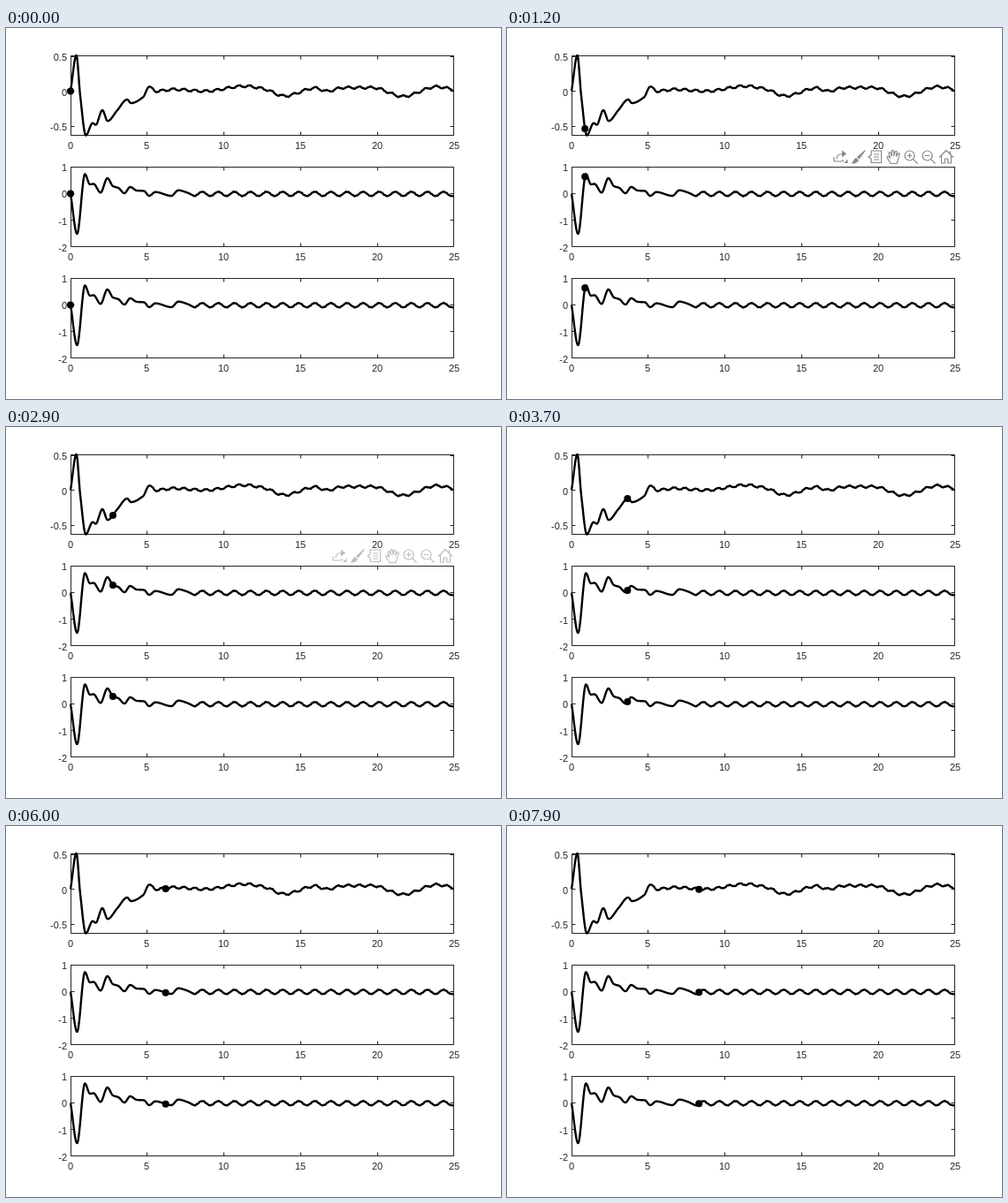
Recreate the animation shown at these times as an HTML page with a canvas. Size 560 px wide and 420 px high, loop 8 s.

```html
<!DOCTYPE html>
<html lang="en">
<head>
<meta charset="utf-8">
<title>Three traces</title>
<style>
  html, body { margin: 0; width: 100%; height: 100%; overflow: hidden; background: #fff; }
  canvas { display: block; }
</style>
</head>
<body>
<canvas id="stage" width="560" height="420"></canvas>
<script>
const ctx = document.getElementById('stage').getContext('2d');
const LOOP = 8000, STEP = 100;
const LEFT = 73, RIGHT = 506;
const INK = '#262626';

const clamp = v => Math.max(0, Math.min(1, v));
const wave = (x, crest, period) => Math.cos(2 * Math.PI * (x - crest) / period);
const grain = x => 0.35 * Math.sin(1.9 * x) * Math.sin(0.37 * x);

// Smooth interpolation that never overshoots the points
function spline(pts) {
  const slope = i => (pts[i + 1][1] - pts[i][1]) / (pts[i + 1][0] - pts[i][0]);
  const tan = pts.map((p, i) => {
    if (i === 0) return slope(0);
    if (i === pts.length - 1) return slope(i - 1);
    const a = slope(i - 1), b = slope(i);
    return a * b <= 0 ? 0 : 2 * a * b / (a + b);
  });
  return x => {
    let i = 0;
    while (i < pts.length - 2 && x > pts[i + 1][0]) i++;
    const [x0, y0] = pts[i], [x1, y1] = pts[i + 1];
    const h = x1 - x0, u = (x - x0) / h, v = 1 - u;
    return y0 * (1 + 2 * u) * v * v + y1 * u * u * (3 - 2 * u)
      + h * u * v * (tan[i] * v - tan[i + 1] * u);
  };
}

// Top trace: main swings and slow drift, with a small ripple once settled
const drift = spline([
  [73, 71.5], [79.6, 31], [84, 77], [90.3, 121.5], [98, 107.7], [101.5, 109.5],
  [109, 93], [115, 105.2], [126, 93], [137, 81], [141.5, 85], [155, 78.3],
  [162, 66.5], [170, 71.5], [190, 69.5], [225, 71.5], [270, 65.8], [292, 69],
  [315, 77], [350, 68], [363, 71.5], [382, 67.5], [415, 67.5], [449, 77.5],
  [487, 66.5], [506, 69.5]
]);
const upper = x => drift(x) + clamp((x - 160) / 10) * (grain(x) - 1.2 * wave(x, 189, 12.4));

// Lower traces: decaying swings that end in a steady ripple
const SETTLED = 213;
const swing = spline([
  [73, 187.5], [80.4, 233], [89.3, 165.5], [95, 177], [99, 176.5], [107, 186.3],
  [114.7, 170], [121, 179], [127, 181], [134, 187], [140.5, 180], [148, 184],
  [156, 184.5], [162, 190], [169, 185.7], [187, 190], [195, 183.7], [204, 186],
  [SETTLED, 190.2]
]);
const lower = x => x < SETTLED ? swing(x) : 187.8 - 2.4 * wave(x, 222, 18.2) + grain(x);

const lowTicks = [[157, '1'], [187.3, '0'], [217.7, '-1'], [248, '-2']];
const charts = [
  { top: 31, bottom: 122, ticks: [[32, '0.5'], [71.5, '0'], [111, '-0.5']], curve: upper },
  { top: 157, bottom: 248, ticks: lowTicks, curve: lower },
  { top: 283, bottom: 374, ticks: lowTicks.map(([y, s]) => [y + 126, s]), curve: x => lower(x) + 126 }
];

for (const c of charts) {
  c.path = new Path2D();
  for (let x = LEFT; x <= RIGHT; x += 0.25) c.path.lineTo(x, c.curve(x));
}

function segment(x0, y0, x1, y1) {
  ctx.moveTo(x0, y0);
  ctx.lineTo(x1, y1);
}

function drawChart(c, dotX) {
  const l = LEFT + 0.5, r = RIGHT + 0.5, t = c.top + 0.5, b = c.bottom - 0.5;
  ctx.strokeStyle = ctx.fillStyle = INK;
  ctx.lineWidth = 1;
  ctx.font = '11px "Liberation Sans", Arial, sans-serif';
  ctx.beginPath();
  ctx.rect(l, t, r - l, b - t);
  ctx.textAlign = 'center';
  for (let v = 0; v <= 25; v += 5) {
    const x = Math.round(289.7 + (v - 12.5) * 17.37);
    const tx = Math.min(r, x + 0.5);
    segment(tx, b, tx, b - 4);
    segment(tx, t, tx, t + 4);
    ctx.fillText(v, x, c.bottom + 15);
  }
  ctx.textAlign = 'right';
  for (const [y, label] of c.ticks) {
    const ty = Math.min(b, Math.floor(y) + 0.5);
    segment(l, ty, l + 4, ty);
    segment(r, ty, r - 4, ty);
    ctx.fillText(label, 69, Math.round(y) + 5);
  }
  ctx.stroke();

  ctx.strokeStyle = ctx.fillStyle = '#000';
  ctx.lineWidth = 2.4;
  ctx.lineJoin = 'round';
  ctx.stroke(c.path);
  ctx.beginPath();
  ctx.arc(dotX, c.curve(dotX), 4, 0, 7);
  ctx.fill();
}

const lens = 'M4 -1.5A5.5 5.5 0 1 1 -7 -1.5A5.5 5.5 0 1 1 4 -1.5M2.6 2.6L7.5 7.5M-4.3 -1.5H1.3';
// Toolbar icons: outline, filled part
const icons = [
  ['M-7 0V5H3V3M-4 2C-4 -2 -1 -3.5 3 -3.5', 'M2 -7.5L7 -3.5L2 0.5ZM4 7H8.5V2.5Z'],
  ['', 'M8 -8L8.5 -7L1.5 2.5L-1.2 0.2ZM-2 1L0.8 3.5C0 6.5 -4 8 -8 7.5C-5 6 -5 2 -2 1Z'],
  ['M-5 -2V-7H6.5V6.5H-5V2L-8 0ZM-2 -3H4M-2 0H4M-2 3H4', ''],
  ['M-3 7.5C-4 4 -7.5 2 -7 -0.2C-6 -1.6 -4.5 0.2 -3.6 1.4L-5 -4.2C-4.8 -6 -3.2 -5.8 -2.8 -4.3L-1.8 -1V-6.5C-1.4 -8 0.3 -8 0.5 -6.5L0.8 -1.3L2.1 -6C2.9 -7.3 4.2 -6.8 4 -5.2L3.4 -0.8L5.4 -3.8C6.5 -4.8 7.6 -3.8 7.1 -2.6C5.5 1 5.5 4 3.8 7.5Z', ''],
  [lens + 'M-1.5 -4.3V1.3', ''],
  [lens, ''],
  ['M-8 0.5L0 -7.5L8 0.5M-5.5 -1.5V7H-1.8V2H1.8V7H5.5V-1.5M4.5 -6.8V-3.5', '']
].map(parts => parts.map(d => new Path2D(d)));

function drawIcons(alpha) {
  ctx.save();
  ctx.globalAlpha = alpha;
  ctx.strokeStyle = ctx.fillStyle = '#888';
  ctx.lineWidth = 1.2;
  ctx.translate(377, 146);
  for (const [line, solid] of icons) {
    ctx.stroke(line);
    ctx.fill(solid);
    ctx.translate(20, 0);
  }
  ctx.restore();
}

// Speeds up over the first steps, then moves evenly
function dotAt(n) {
  const ramp = 8.2;
  return LEFT + 1.925 * (n < ramp ? n * n / (2 * ramp) : n - ramp / 2);
}

function draw(ms) {
  const n = Math.floor(ms % LOOP / STEP);
  ctx.fillStyle = '#fff';
  ctx.fillRect(0, 0, 560, 420);
  for (const c of charts) drawChart(c, dotAt(n));
  const alpha = Math.min(clamp(n / 4), clamp((31 - n) / 3.6));
  if (alpha > 0) drawIcons(alpha);
}

let start;
function tick(now) {
  start ??= now;
  draw(now - start);
  requestAnimationFrame(tick);
}
draw(0);
requestAnimationFrame(tick);
</script>
</body>
</html>
```
